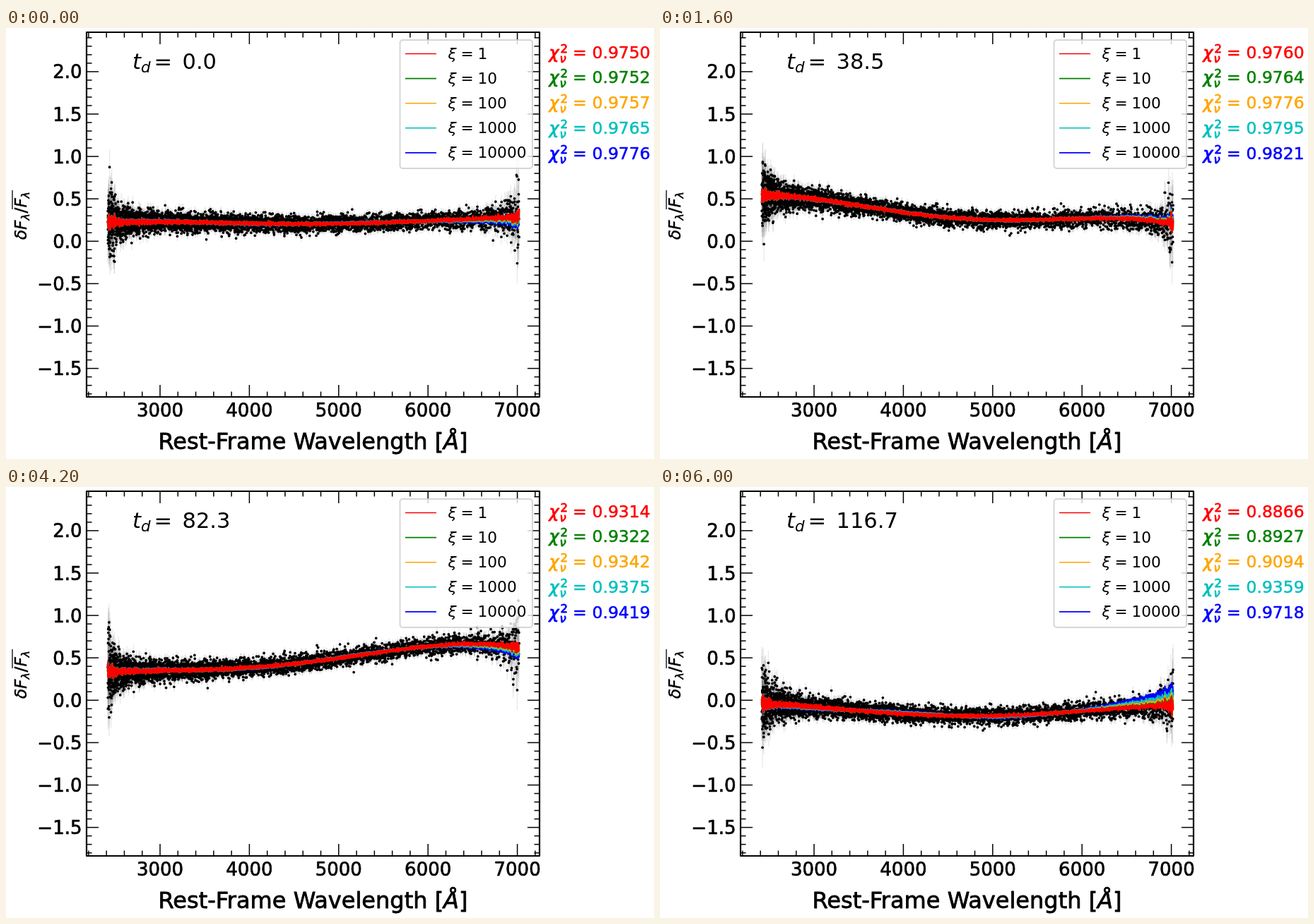
These frames come from a looping animation (917x611 px, 6200 ms). An HTML page with a canvas:

```html
<!DOCTYPE html>
<html lang="en">
<head>
<meta charset="utf-8">
<title>Spectrum fits over time</title>
<style>
html, body { margin: 0; width: 100%; height: 100%; overflow: hidden; background: #fff; }
canvas { display: block; }
</style>
</head>
<body>
<canvas id="stage" width="917" height="611"></canvas>
<script>
const ctx = document.getElementById('stage').getContext('2d');
const LOOP = 6200, STEP = 200;
const BOX = { l: 114, r: 755, t: 6, b: 523 };
const COLORS = ['#f00', '#008000', '#ffa500', '#00bfbf', '#00f'];
const UNIT = 120.2;
const px = w => 218 + (w - 3000) * .1264;
const py = v => 302.3 - v * UNIT;

// How far each fit departs from the first one, 0 to 1
const spread = i => (i / 4) ** 1.9;

// The fits are quartics through their heights at NODES
const NODES = [2415, 3300, 4700, 6100, 7020];
const KEYS = [
  { step: 0, delay: 0, chi: .975, excess: .0026, gap: -.07, heights: [.22, .225, .205, .245, .285] },
  { step: 5, delay: 25, chi: .9844, excess: .0386, gap: .11, heights: [.42, .315, .27, .425, .32] },
  { step: 8, delay: 38.5, chi: .976, excess: .0061, gap: .05, heights: [.54, .455, .265, .27, .2] },
  { step: 13, delay: 57.4, chi: .9699, excess: .0704, gap: .15, heights: [.54, .465, .39, .46, .22] },
  { step: 21, delay: 82.3, chi: .9314, excess: .0105, gap: -.08, heights: [.33, .355, .455, .645, .62] },
  { step: 25, delay: 97.2, chi: .9528, excess: .0025, gap: .03, heights: [.22, .195, .195, .39, .375] },
  { step: 30, delay: 116.7, chi: .8866, excess: .0852, gap: .18, heights: [-.04, -.105, -.185, -.12, -.06] }
];

// Wavelength samples, evenly spaced in the logarithm
const COUNT = 4634;
const samples = Array.from({ length: COUNT }, (_, i) => {
  const w = 2415 * (7020 / 2415) ** (i / (COUNT - 1));
  const u = (w - 4717.5) / 2302.5;
  const left = w - 2415, right = 7020 - w;
  return {
    x: px(w),
    basis: NODES.map(a => NODES.reduce((p, b) => a === b ? p : p * (w - b) / (a - b), 1)),
    sigma: .05 + .14 * Math.exp(-left / 60) + .065 * Math.exp(-left / 350)
      + .2 * Math.exp(-right / 60) + .05 * Math.exp(-right / 350),
    gap: .1 * Math.cos(2 * Math.PI * (u + .3)) + Math.max(0, 2 * u - 1) ** 2
  };
});

function gaussian(seed) {
  const random = () => {
    seed = seed + 0x6D2B79F5 | 0;
    let t = Math.imul(seed ^ seed >>> 15, 1 | seed);
    t = t + Math.imul(t ^ t >>> 7, 61 | t) ^ t;
    return ((t ^ t >>> 14) >>> 0) / 4294967296;
  };
  return () => Math.sqrt(-2 * Math.log(1 - random())) * Math.cos(2 * Math.PI * random());
}

function stateAt(step) {
  const k = Math.max(1, KEYS.findIndex(key => key.step >= step));
  const a = KEYS[k - 1], b = KEYS[k], f = (step - a.step) / (b.step - a.step);
  const mix = name => a[name] + (b[name] - a[name]) * f;
  return {
    step,
    delay: mix('delay'),
    chi: mix('chi'),
    excess: mix('excess'),
    gap: mix('gap'),
    heights: a.heights.map((h, i) => h + (b.heights[i] - h) * f)
  };
}

function text(s, x, y, size, { color = '#000', italic = false, align = 'left', heavy = 0 } = {}) {
  ctx.font = `${italic ? 'italic ' : ''}${size}px "DejaVu Sans", sans-serif`;
  ctx.textAlign = align;
  ctx.fillStyle = ctx.strokeStyle = color;
  ctx.fillText(s, x, y);
  if (heavy) {
    ctx.lineWidth = heavy;
    ctx.strokeText(s, x, y);
  }
  return ctx.measureText(s).width;
}

function line(x1, y1, x2, y2, width, color = '#000') {
  ctx.beginPath();
  ctx.moveTo(x1, y1);
  ctx.lineTo(x2, y2);
  ctx.lineWidth = width;
  ctx.strokeStyle = color;
  ctx.stroke();
}

function drawData({ step, heights, gap }) {
  const normal = gaussian(step * 7919 + 17);
  const points = samples.map(s => {
    const base = s.basis.reduce((sum, b, i) => sum + b * heights[i], 0);
    return { ...s, base, value: base + normal() * s.sigma, jitter: normal() * s.sigma * .18 };
  });

  ctx.fillStyle = 'rgba(0,0,0,.09)';
  for (const p of points) ctx.fillRect(p.x - .65, py(p.value + p.sigma), 1.3, p.sigma * 2 * UNIT);

  ctx.fillStyle = '#000';
  ctx.beginPath();
  for (const p of points) {
    ctx.moveTo(p.x, py(p.value));
    ctx.arc(p.x, py(p.value), 1.9, 0, 7);
  }
  ctx.fill();

  ctx.lineWidth = 2.3;
  ctx.lineJoin = 'round';
  for (let c = COLORS.length - 1; c >= 0; c--) {
    ctx.beginPath();
    for (const p of points) ctx.lineTo(p.x, py(p.base + p.jitter + gap * spread(c) * p.gap));
    ctx.strokeStyle = COLORS[c];
    ctx.stroke();
  }
}

function drawAxes() {
  const { l, r, t, b } = BOX;
  for (let w = 2200; w <= 7200; w += 200) {
    const major = w % 1000 === 0, len = major ? 17 : 7.5, x = px(w);
    line(x, b, x, b - len, 1.5);
    line(x, t, x, t + len, 1.5);
    if (major) text(w, x, 551, 26, { align: 'center', heavy: .7 });
  }
  for (let n = -18; n <= 24; n++) {
    const major = n % 5 === 0, len = major ? 17 : 7.5, y = py(n / 10);
    line(l, y, l + len, y, 1.5);
    line(r, y, r - len, y, 1.5);
    if (major) {
      const label = (n < 0 ? '\u2212' : '') + Math.abs(n / 10).toFixed(1);
      text(label, 107.5, y + 9.5, 26, { align: 'right', heavy: .7 });
    }
  }
  ctx.lineWidth = 2.2;
  ctx.strokeStyle = '#000';
  ctx.strokeRect(l, t, r - l, b - t);

  let x = 215.5;
  for (const part of ['Rest-Frame Wavelength [', 'Å', ']']) {
    x += text(part, x, 596.5, 32, { italic: part === 'Å', heavy: .8 });
  }

  ctx.save();
  ctx.translate(29, 300);
  ctx.rotate(-Math.PI / 2);
  const style = { italic: true, heavy: .5 };
  text('δF', 0, 0, 23, style);
  text('λ', 27.5, 4, 16, style);
  text('/', 37.5, 0, 23, { heavy: .5 });
  text('F', 45.5, 0, 23, style);
  text('λ', 58.5, 4, 16, style);
  line(43, -20, 70, -20, 1.3);
  ctx.restore();
}

function drawLegend() {
  ctx.beginPath();
  ctx.roundRect(557.5, 17, 187.5, 182, 4);
  ctx.fillStyle = 'rgba(255,255,255,.8)';
  ctx.fill();
  ctx.lineWidth = 2;
  ctx.strokeStyle = 'rgba(204,204,204,.8)';
  ctx.stroke();
  COLORS.forEach((color, i) => {
    const y = 36.5 + i * 35.1;
    line(565, y, 609, y, 1.6, color);
    text('ξ', 625.5, y + 7.5, 21.7, { italic: true });
    text('=', 643.5, y + 7.5, 21.7);
    text(10 ** i, 667.5, y + 7.5, 21.7);
  });
}

function drawValues({ delay, chi, excess }) {
  text('t', 179, 58, 30.5, { italic: true });
  text('d', 191, 63, 21.4, { italic: true });
  text('=', 209.5, 58, 30.5);
  text(delay.toFixed(1), 249.5, 58, 30.5);
  COLORS.forEach((color, i) => {
    const y = 42.5 + i * 35.9;
    text('χ', 768.5, y, 23.5, { color, italic: true, heavy: 1 });
    text('2', 784.5, y - 8, 16.5, { color, heavy: .8 });
    text('ν', 783.5, y + 6, 16.5, { color, italic: true, heavy: .8 });
    text('=', 802, y, 23.5, { color, heavy: .5 });
    text((chi + excess * spread(i)).toFixed(4), 829.5, y, 23.5, { color, heavy: .5 });
  });
}

let shown = -1;
function tick() {
  const step = Math.floor(performance.now() % LOOP / STEP);
  if (step !== shown) {
    shown = step;
    const state = stateAt(step);
    ctx.fillStyle = '#fff';
    ctx.fillRect(0, 0, 917, 611);
    drawData(state);
    drawAxes();
    drawLegend();
    drawValues(state);
  }
  requestAnimationFrame(tick);
}
tick();
</script>
</body>
</html>
```
